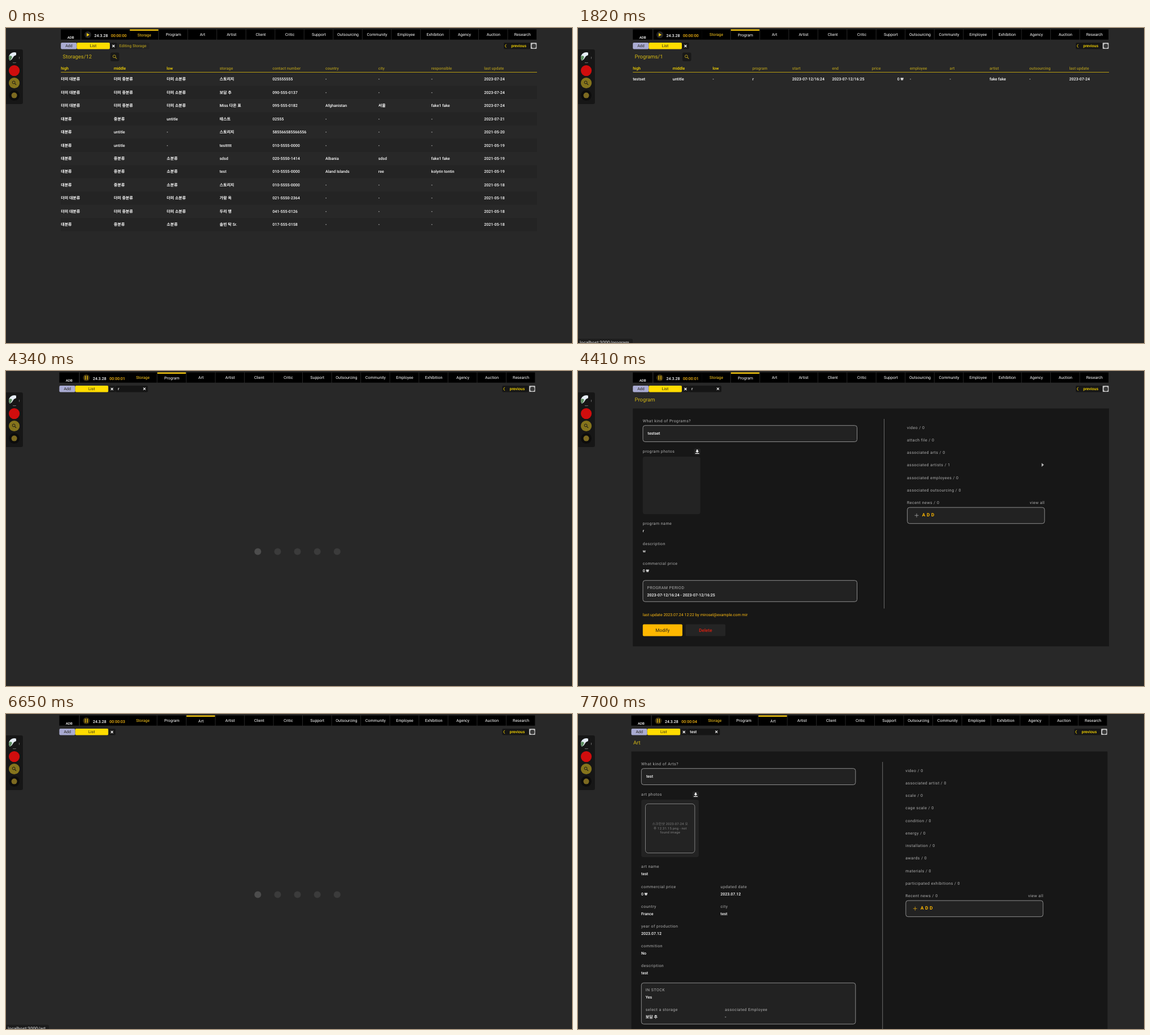
An HTML page that plays this animation: 1003x559 px, repeating every 8000 ms.

```html
<!DOCTYPE html>
<html lang="ko">
<head>
<meta charset="utf-8">
<title>Art database</title>
<style>
html, body { margin: 0; width: 100%; height: 100%; overflow: hidden; background: #282828; }
svg { display: block; width: 100%; height: 100%; }
text { font: 500 7.04px Roboto, "Noto Sans CJK KR", "Noto Sans CJK", sans-serif; fill: #fff; white-space: pre; text-rendering: geometricPrecision; }
.hangul { font-weight: 700; }
.thin { font-weight: 400; }
.label { font-weight: 400; fill: #b0b0b0; letter-spacing: .47px; }
.alt { font-weight: 400; font-size: 5.87px; fill: #808080; letter-spacing: .25px; }
.alt .hangul { font-weight: 400; }
.olive { fill: #a8921c; }
.yellow { fill: #ffdc00; }
.gold { fill: #fdbb12; }
.amber { fill: #ffcb1c; }
.red { fill: #dc2010; }
.title { font-weight: 400; font-size: 9.4px; fill: #d4b714; }
.dark { font-weight: 400; fill: #24221a; }
.btn { font-size: 8.2px; }
.add { font-weight: 700; font-size: 8.2px; fill: #ffb800; letter-spacing: 2.7px; }
.logo { font-size: 6.1px; }
.status { font-weight: 400; font-size: 8.16px; fill: #e4e4e4; }
</style>
</head>
<body>
<svg viewBox="0 0 1003 559" preserveAspectRatio="none">
  <g id="page"></g>
  <g id="side"></g>
  <g id="status"></g>
</svg>
<script>
const LOOP = 8000, LEFT = 97.2, RIGHT = 941, TAB = 51.55, NAV = 219.4;
const $ = id => document.getElementById(id);

// y is the middle of the capitals; Hangul runs are set heavier than Latin
const text = (x, y, s, cls = '', anchor = 'start') =>
  `<text x="${x}" y="${y + 2.5}" class="${cls}" text-anchor="${anchor}">` +
  s.replace(/[가-힣]+/g, '<tspan class="hangul">$&</tspan>') + '</text>';
const rect = (x, y, w, h, fill, r = 0, stroke = 'none') =>
  `<rect x="${x}" y="${y}" width="${w}" height="${h}" rx="${r}" fill="${fill}" stroke="${stroke}" stroke-width=".8"/>`;
const disc = (x, y, r, fill) => `<circle cx="${x}" cy="${y}" r="${r}" fill="${fill}"/>`;
const line = (d, color, w = 1) => `<path d="${d}" fill="none" stroke="${color}" stroke-width="${w}"/>`;
const shape = (d, fill) => `<path d="${d}" fill="${fill}"/>`;
const cross = (x, y) => line(`M${x - 2} ${y - 2}l4 4m0 -4l-4 4`, '#fff', 1.1);
const lens = (x, y, color) =>
  `<circle cx="${x - .9}" cy="${y - .9}" r="2.4" fill="none" stroke="${color}"/>` + line(`M${x + .9} ${y + .9}l2.6 2.6`, color, 1.2);

const NAMES = ['Storage', 'Program', 'Art', 'Artist', 'Client', 'Critic', 'Support', 'Outsourcing',
  'Community', 'Employee', 'Exhibition', 'Agency', 'Auction', 'Research'];

function nav(active) {
  return NAMES.map((name, i) => {
    const x = NAV + i * TAB, on = name === active;
    return rect(x, 2.5, TAB - 1, 18.2, '#000') + (on ? rect(x, 2.5, TAB - 1, 2.3, '#ffcf10') : '') +
      text(x + TAB / 2, on ? 12 : 11.6, name, 'thin' + (i ? '' : ' amber'), 'middle');
  }).join('');
}

function header(s) {
  const button = s.running
    ? disc(145, 12, 6, '#3a3011') + line('M143.3 8.6v6.8m3.6 0v-6.8', '#e0b310', 1.5)
    : disc(145, 12, 6, '#262626') + shape('M143 9l5.2 3l-5.2 3z', '#ffcf10');
  let h = rect(LEFT, 2.5, 34.8, 18.2, '#000') + text(114.6, 16, 'ADB', 'logo', 'middle') +
    rect(133.5, 2.5, 86, 18.2, '#000') + button +
    text(156.6, 13.2, '24.3.28') + text(186, 13.2, '00:00:0' + s.seconds, 'gold') + nav(s.active);
  h += rect(LEFT, 26, 28.2, 11.6, '#a9abd2', 2) + text(111.4, 31, 'Add', 'dark', 'middle') +
    rect(125.4, 26, 58.6, 11.6, '#ffdc00', 2) + text(154.5, 31, 'List', 'dark', 'middle') +
    rect(184.4, 26, 12.4, 11.6, '#181818', 2) + cross(190.5, 32);
  if (s.tab === 'Editing Storage') h += rect(196.8, 26, 57.4, 11.6, '#232323', 2) + text(200.8, 31, s.tab, 'olive');
  else if (s.tab) h += rect(196.8, 26, 57.4, 11.6, '#151515', 2) + text(201, 31, s.tab) + cross(248, 31.7);
  return h + rect(882, 26, 47, 11.6, '#161616', 2) + line('M886.4 28.8l-2 3l2 3', '#ffdc00', .9) +
    text(895.2, 31, 'previous', 'yellow') +
    rect(929.8, 26.2, 10.6, 10.8, '#c8c8c8', 1) + rect(931.6, 28, 7.6, 7.8, '#3a3a3a', 3);
}

function table(title, heads, xs, rows) {
  let h = text(100.6, 51, title, 'title') + rect(185, 43.5, 15.6, 15.6, '#191919', 3) + lens(192.8, 51.2, '#b39b1c');
  h += heads.map((s, i) => text(xs[i], 71.5, s, i < 3 ? 'yellow' : 'olive')).join('');
  h += rect(LEFT, 78, RIGHT - LEFT, 1, '#b59c12');
  rows.forEach((row, r) => {
    const y = 90.8 + r * 23.45;
    if (r % 2) h += rect(LEFT, y - 11.7, RIGHT - LEFT, 23.45, '#242424');
    row.forEach((s, i) => {
      h += heads[i] === 'price' ? text(577, y, s, '', 'end') : text(xs[i], y, s);
    });
  });
  return h;
}

const dummy = ['더미 대분류', '더미 중분류', '더미 소분류'], kinds = ['대분류', '중분류', '소분류'];
const bare = ['대분류', 'untitle', '-'], none = ['-', '-', '-'];
const storageRows = [
  [...dummy, '스토리지', '025555555', ...none, '2023-07-24'],
  [...dummy, '보담 추', '090-555-0137', ...none, '2023-07-24'],
  [...dummy, 'Miss 다온 표', '095-555-0182', 'Afghanistan', '서울', 'fake1 fake', '2023-07-24'],
  ['대분류', '중분류', 'untitle', '테스트', '02555', ...none, '2023-07-21'],
  [...bare, '스토리지', '585566585566556', ...none, '2021-05-20'],
  [...bare, 'testtttt', '010-5555-0000', ...none, '2021-05-19'],
  [...kinds, 'sdsd', '020-5550-1414', 'Albania', 'sdsd', 'fake1 fake', '2021-05-19'],
  [...kinds, 'test', '010-5555-0000', 'Aland Islands', 'ree', 'kolyrin tontin', '2021-05-19'],
  [...kinds, '스토리지', '010-5555-0000', ...none, '2021-05-18'],
  [...dummy, '가람 옥', '021-5550-2364', ...none, '2021-05-18'],
  [...dummy, '두리 맹', '041-555-0126', ...none, '2021-05-18'],
  [...kinds, '솔빈 탁 Sr.', '017-555-0158', ...none, '2021-05-18']
];
const even = n => Array.from({ length: n }, (_, i) => LEFT + i * (RIGHT - LEFT) / n);
const programXs = Array.from({ length: 12 }, (_, i) => LEFT + i * 70.6 - (i > 6 ? 3.4 : 0));

const storages = () => table('Storages/12',
  ['high', 'middle', 'low', 'storage', 'contact number', 'country', 'city', 'responsible', 'last update'],
  even(9), storageRows);
const programs = () => table('Programs/1',
  ['high', 'middle', 'low', 'program', 'start', 'end', 'price', 'employee', 'art', 'artist', 'outsourcing', 'last update'],
  programXs,
  [['testset', 'untitle', '-', 'r', '2023-07-12/16:24', '2023-07-12/16:25', '0 ₩', '-', '-', 'fake fake', '-', '2023-07-24']]);
const arts = () => table('Arts/1',
  ['high', 'middle', 'low', 'art', 'country', 'city', 'storage', 'artist', 'last update'],
  even(9), [['test', '-', '-', 'test', 'France', 'test', '보담 추', '-', '2023-07-24']]);

const loading = () => [0, 1, 2, 3, 4].map(i => disc(448.9 + i * 35.15, 320.5, 6, i ? '#3b3b3b' : '#4d4d4d')).join('');

const field = (x, y, label, value) => text(x, y, label, 'label') + text(x, y + 13, value);
const box = (x, y, w, h) => rect(x, y, w, h, '#222', 4, '#aaa');

function detail(d, photo) {
  let h = text(100.6, 51, d.title, 'title') + rect(LEFT, 66.5, RIGHT - LEFT, d.bottom - 66.5, '#171717');
  h += text(114.8, 88.2, `What kind of ${d.title}s?`, 'label') + box(115, 96.7, 379.5, 28.8) + text(123.6, 110.6, d.kind);
  h += text(114.8, 142.4, d.title.toLowerCase() + ' photos', 'label') + rect(205.5, 137.5, 11.4, 11.4, '#242424', 2) +
    shape('M210 139.6h2.4v2.4h1.8l-3 3l-3-3h1.8zM207.8 145.8h6.8v1.2h-6.8z', '#fff');
  h += rect(114.8, 152, 102, 102, '#232323', 4);
  if (photo) h += rect(122.2, 159.4, 87.4, 87.2, 'none', 5, '#999') +
    d.alt.map((s, i) => text(166, 194.6 + i * 7.6, s, 'alt', 'middle')).join('');
  d.fields.forEach(([x, row, label, value]) => h += field(x, 270.8 + row * 35.2, label, value));
  h += d.extra() + rect(542, 85, .9, d.rule - 85, '#777');

  d.items.forEach((s, i) => h += text(583, 100 + i * 22.25, s, 'label'));
  const y = 100 + d.items.length * 22.25;
  h += text(583, y, 'Recent news / 0', 'label') + text(827.3, y, 'view all', 'label', 'end') +
    box(583.6, y + 8.6, 243.2, 28.6) + line(`M596.6 ${y + 22.8}h7m-3.5 -3.5v7`, d.plus, .8) + text(609.8, y + 22.4, 'ADD', 'add');
  return h;
}

const programDetail = {
  title: 'Program', kind: 'testset', bottom: 488.6, rule: 421.5, plus: '#aaa',
  alt: ['스크린샷 2023-07-24 오', '전 11.18.35.png - not', 'found image'],
  fields: [[114.8, 0, 'program name', 'r'], [114.8, 1, 'description', 'w'], [114.8, 2, 'commercial price', '0 ₩']],
  items: ['video / 0', 'attach file / 0', 'associated arts / 0', 'associated artists / 1',
    'associated employees / 0', 'associated outsourcing / 0'],
  extra: () => box(115, 371.7, 379.5, 37.6) + field(122.6, 384, 'PROGRAM PERIOD', '2023-07-12/16:24 - 2023-07-12/16:25') +
    text(114.8, 432.4, 'last update 2023.07.24 12:22 by mirosel@example.com mir', 'thin gold') +
    rect(114.8, 449.5, 70.2, 21, '#ffb800', 2) + text(149.9, 460.2, 'Modify', 'btn dark', 'middle') +
    rect(190.6, 449.5, 70.6, 21, '#242424', 2) + text(225.9, 460.2, 'Delete', 'btn red', 'middle') +
    shape('M821.6 163.2l4 3.4l-4 3.4z', '#bbb')
};

const artDetail = {
  title: 'Art', kind: 'test', bottom: 559, rule: 559, plus: '#e0a810',
  alt: ['스크린샷 2023-07-24 오', '후 12.31.15.png - not', 'found image'],
  fields: [[114.8, 0, 'art name', 'test'], [114.8, 1, 'commercial price', '0 ₩'], [255.3, 1, 'updated date', '2023.07.12'],
    [114.8, 2, 'country', 'France'], [255.3, 2, 'city', 'test'], [114.8, 3, 'year of production', '2023.07.12'],
    [114.8, 4, 'commition', 'No'], [114.8, 5, 'description', 'test']],
  items: ['video / 0', 'associated artist / 0', 'scale / 0', 'cage scale / 0', 'condition / 0', 'energy / 0',
    'installation / 0', 'awards / 0', 'materials / 0', 'participated exhibitions / 0'],
  extra: () => box(115, 477.2, 379.5, 73) + field(122.4, 489, 'IN STOCK', 'Yes') +
    field(122.4, 524, 'select a storage', '보담 추') + field(263, 524, 'associated Employee', '-')
};

// start, active section, open tab, content, moved by the scrollbar
const scenes = [
  [0, 'Storage', 'Editing Storage', storages, false],
  [1680, 'Program', '', loading, true],
  [1750, 'Program', '', programs, false],
  [4340, 'Program', 'r', loading, true],
  [4410, 'Program', 'r', () => detail(programDetail, false), false],
  [4480, 'Program', 'r', () => detail(programDetail, true), false],
  [6650, 'Art', '', loading, true],
  [6720, 'Art', '', arts, false],
  [7490, 'Art', 'test', loading, true],
  [7560, 'Art', 'test', () => detail(artDetail, false), true],
  [7630, 'Art', 'test', () => detail(artDetail, true), true]
];
const ticks = [4340, 5460, 6440, 7560];

// path, shown from, swapped or fading from, gone at
const links = [['program', 1540, 2380, 2380], ['storage', 2380, 2680, 2940], ['art', 6440, 7090, 7280]];

function drawSide() {
  $('side').innerHTML = rect(-3, 38, 33, 97, '#161616', 3) +
    '<clipPath id="round"><circle cx="14.6" cy="52.6" r="9.6"/></clipPath><g clip-path="url(#round)">' +
    shape('M5 43h13v5l-4 2l-4 6l-5 3z', '#e6edf5') + shape('M5 50q4 -2 6 1l-2 5l-4 3z', '#5f8f62') +
    line('M12 62h6M24 51v4', '#ddd', .8) + '</g>' +
    disc(14.6, 75.6, 9.6, '#d00d0d') + disc(14.6, 97.5, 9.6, '#85741c') + lens(14.6, 97.4, '#191919') +
    disc(14.6, 119.6, 9.4, '#0c0c0c') + disc(14.6, 119.6, 5, '#7d6a20');
}

let last = '';
function draw(t) {
  const index = scenes.filter(s => s[0] <= t).length - 1;
  const [, active, tab, content, moved] = scenes[index];
  const seconds = ticks.filter(k => k <= t).length, running = t >= 3290;
  const key = [index, seconds, running].join();
  if (key !== last) {
    $('page').innerHTML = header({ active, tab, seconds, running }) + content();
    $('page').setAttribute('transform', `translate(${moved ? -2.7 : 0} 0)`);
    last = key;
  }
  const link = links.find(l => t >= l[1] && t < l[3]);
  const name = link ? link[0] : '';
  if ($('status').dataset.name !== name) {
    $('status').dataset.name = name;
    const width = { program: 97, storage: 94, art: 76 }[name];
    $('status').innerHTML = name ? rect(-3, 551.5, width + 3, 12, '#1d1d1d', 3) +
      text(3, 558.6, 'localhost:3000/' + name, 'status') : '';
  }
  if (link) $('status').setAttribute('opacity', t < link[2] ? 1 : (link[3] - t) / (link[3] - link[2]));
}

drawSide();
const start = performance.now();
function frame() {
  draw((performance.now() - start) % LOOP);
  requestAnimationFrame(frame);
}
frame();
</script>
</body>
</html>
```
